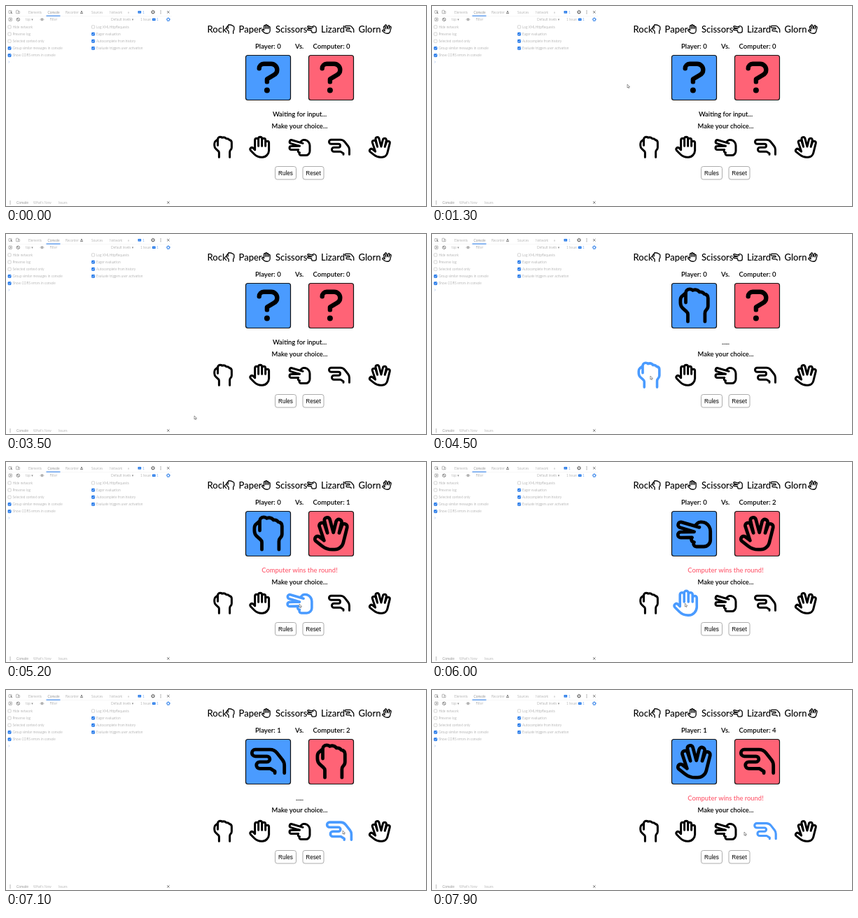
These frames come from a looping animation (600 px wide and 286 px high, 8 s). An HTML page with a canvas:

```html
<!DOCTYPE html>
<html lang="en">
<head>
<meta charset="utf-8">
<title>Hand game</title>
<style>
html, body { margin: 0; width: 100%; height: 100%; overflow: hidden; background: #fff; }
canvas { display: block; width: 600px; height: 286px; }
</style>
</head>
<body>
<canvas id="stage" width="600" height="286"></canvas>
<script>
const ctx = document.getElementById("stage").getContext("2d");
const LOOP = 8000;
const BLUE = "#4a9bff", RED = "#ff6376", LINK = "#1a73e8", GRAY = "#858585";
const FONT = "Lato, 'Open Sans', sans-serif";

// Centre lines on a 512-unit grid; cx is the horizontal middle.
const icon = (cx, path, width = 48) => ({ cx, width, path: new Path2D(path) });
const icons = {
  rock: icon(226, `M136 488V384Q136 362 116 345L66 300Q30 266 30 220V180Q30 146 54 124L106 80
    M106 216V80C106 48 130 24 163 24Q188 24 207 41Q224 32 243 32Q282 34 302 66Q346 58 370 92
    Q424 100 424 152V264Q424 300 398 324Q380 342 380 372V488`),
  paper: icon(246, `M136 320V96a40 40 0 0 1 80 0V232M216 96V64a40 40 0 0 1 80 0V232M296 96a40 40 0 0 1 80 0V232
    M376 160a40 40 0 0 1 80 0V336C452 420 385 488 304 488H288C226 488 167 464 123 420L36 332
    a40 40 0 0 1 56 -56L136 320`),
  scissors: icon(256, `M256 234L56 174a40 40 0 0 1 22 -77L330 170M268 150L301 115C313 101 330 94 348 94H358
    C404 94 446 118 469 157Q488 189 488 225V350a96 96 0 0 1 -96 96H288a40 40 0 0 1 -32 -64
    a40 40 0 0 1 -29 -67L65 318a40 40 0 0 1 -2 -80L256 234`),
  lizard: icon(256, `M488 424V316C488 288 479 260 461 237L382 137C358 106 321 88 282 88H72a48 48 0 0 0 0 96
    H240a40 40 0 0 1 0 80H136a48 48 0 0 0 0 96H288L352 400V424`),
  salute: icon(290, `M188 358L122 159a40 40 0 0 1 75 -28L236 249M236 249L194 74a40 40 0 0 1 76 -21L322 245
    L361 88a40 40 0 0 1 79 16L405 250M405 250L440 152a40 40 0 0 1 78 18L463 391C449 448 398 488 340 488H306
    C254 488 205 471 163 439L71 367a40 40 0 0 1 49 -63L188 358`),
  unknown: icon(160, `M32 128a64 64 0 0 1 64 -64H204a84 84 0 0 1 84 84c0 32 -18 60 -47 75L144 280v40`, 64)
};

const hands = [
  { name: "rock", label: "Rock", x: 310, labelX: 287.5, iconX: 320.5 },
  { name: "paper", label: "Paper", x: 362.5, labelX: 332.5, iconX: 371.5 },
  { name: "scissors", label: "Scissors", x: 419.5, labelX: 385, iconX: 437 },
  { name: "lizard", label: "Lizard", x: 476, labelX: 450, iconX: 490.5 },
  { name: "salute", label: "Glorn", x: 534, labelX: 503.5, iconX: 544 }
];

const rounds = [
  { click: 4400, result: 4800, pick: "rock", reply: "salute", winner: "Computer" },
  { click: 5350, result: 5750, pick: "scissors", reply: "salute", winner: "Computer" },
  { click: 6050, result: 6450, pick: "paper", reply: "rock", winner: "Player" },
  { click: 6900, result: 7300, pick: "lizard", reply: "rock", winner: "Computer" },
  { click: 7450, result: 7800, pick: "salute", reply: "lizard", winner: "Computer" }
];

// time, x, y
const track = [
  [100, 474, 236], [500, 250, 110], [900, 72, 9], [1000, 6, 12], [1300, 279, 112], [1600, 518, 234],
  [1900, 512, 190], [2100, 240, 266], [2300, 146, 276], [2600, 376, 90], [2900, 220, 190],
  [3100, 155, 88], [3300, 200, 180], [3500, 269, 260], [3700, 290, 240], [3900, 298, 222],
  [4100, 311, 203], [4600, 312, 203], [4800, 345, 206], [5050, 417, 204], [5200, 419, 203],
  [5550, 419, 203], [5800, 362, 202], [6350, 360, 202], [6700, 474, 201], [7100, 481, 201],
  [7200, 484, 201], [7350, 534, 202], [7600, 532, 202], [7780, 455, 203], [7900, 446, 203]
];

function cursorAt(t) {
  const next = track.findIndex(p => p[0] > t);
  if (next < 0) return track[track.length - 1].slice(1);
  if (next === 0) return [-20, -20];
  const [t0, x0, y0] = track[next - 1], [t1, x1, y1] = track[next];
  const u = (t - t0) / (t1 - t0), k = u * u * (3 - 2 * u);
  return [x0 + (x1 - x0) * k, y0 + (y1 - y0) * k];
}

// Share of the last 200 ms spent over a hand: grows and shrinks like a transition.
function hoverAmount(t, x) {
  const steps = 20;
  let inside = 0;
  for (let i = 0; i < steps; i++) {
    const [mx, my] = cursorAt(t - i * 200 / steps);
    if (Math.abs(mx - x) < 17 && Math.abs(my - 201.5) < 17) inside++;
  }
  return inside / steps;
}

function text(str, x, y, size, { color = "#000", weight = 400, align = "left", font = FONT } = {}) {
  ctx.font = `${weight} ${size}px ${font}`;
  ctx.fillStyle = color;
  ctx.textAlign = align;
  ctx.fillText(str, x, y);
}

function drawIcon(name, x, y, scale, color = "#000") {
  const { cx, width, path } = icons[name];
  ctx.save();
  ctx.translate(x, y);
  ctx.scale(scale, scale);
  ctx.translate(-cx, -256);
  ctx.lineWidth = width;
  ctx.lineCap = ctx.lineJoin = "round";
  ctx.strokeStyle = color;
  ctx.stroke(path);
  if (name === "unknown") dot(144, 440, 40, color);
  ctx.restore();
}

function dot(x, y, r, color) {
  ctx.fillStyle = color;
  ctx.beginPath();
  ctx.arc(x, y, r, 0, Math.PI * 2);
  ctx.fill();
}

function ring(x, y, r, color, width = 0.7) {
  ctx.beginPath();
  ctx.arc(x, y, r, 0, Math.PI * 2);
  ctx.strokeStyle = color;
  ctx.lineWidth = width;
  ctx.stroke();
}

function line(points, color, width = 0.7) {
  ctx.beginPath();
  points.forEach(([x, y]) => ctx.lineTo(x, y));
  ctx.strokeStyle = color;
  ctx.lineWidth = width;
  ctx.stroke();
}

function box(x, y, w, h, r, fill, stroke, width = 1) {
  ctx.beginPath();
  ctx.roundRect(x, y, w, h, r);
  ctx.fillStyle = fill;
  ctx.fill();
  if (!stroke) return;
  ctx.strokeStyle = stroke;
  ctx.lineWidth = width;
  ctx.stroke();
}

function small(str, x, y, color = GRAY) {
  text(str, x, y, 4.85, { color, weight: 300 });
}

function checkbox(x, y, label, checked) {
  box(x + 0.4, y - 2.2, 4.3, 4.3, 0.8, checked ? LINK : "#fff", checked ? LINK : "#aaa", 0.5);
  if (checked) line([[x + 1.2, y], [x + 2.2, y + 1], [x + 4, y - 1.2]], "#fff");
  small(label, x + 7, y + 1.7);
}

function gear(x, y, color) {
  ring(x, y, 1.8, color, 1);
  ctx.setLineDash([0.9, 0.9]);
  ring(x, y, 2.6, color);
  ctx.setLineDash([]);
}

function cross(x, y) {
  line([[x - 1.7, y - 1.7], [x + 1.7, y + 1.7]], "#444");
  line([[x + 1.7, y - 1.7], [x - 1.7, y + 1.7]], "#444");
}

function moreDots(x, y) {
  for (const dy of [-2, 0, 2]) dot(x, y + dy, 0.5, "#444");
}

function badge(x, y) {
  box(x, y - 2, 4.6, 3.6, 0.6, LINK);
  line([[x + 1, y - 0.3], [x + 3.6, y - 0.3]], "#fff", 0.5);
}

function drawPanel() {
  line([[0, 14.5], [237, 14.5]], "#f2f2f2", 0.6);

  box(4, 6.5, 4, 4, 0.5, "#fff", "#888", 0.6);
  line([[9, 11], [6.5, 8.5], [8, 8.5]], "#555");
  box(14.5, 6.2, 3, 4.6, 0.5, "#fff", "#888", 0.6);
  box(17.5, 7.5, 2, 3.3, 0.4, "#fff", "#888", 0.6);
  small("Elements", 32, 10.5);
  small("Console", 59.5, 10.5, "#444");
  box(57.5, 13.6, 20, 1, 0, LINK);
  small("Recorder", 85, 10.5);
  line([[107.5, 7], [107.5, 8.3], [106.4, 10.5], [109.6, 10.5], [108.5, 8.3], [108.5, 7]], "#555");
  small("Sources", 122, 10.5);
  small("Network", 148, 10.5);
  small("»", 174, 10.5, "#444");
  badge(188.5, 9);
  small("1", 195, 10.5, LINK);
  gear(210, 8.7, "#555");
  moreDots(221, 8.7);
  cross(231.8, 8.7);

  box(4, 17, 4.4, 4.4, 0.4, "#fff", "#888", 0.6);
  line([[5.5, 18], [7.2, 19.2], [5.5, 20.4]], "#555");
  ring(17.3, 19.3, 2.2, "#555");
  line([[15.8, 17.8], [18.8, 20.8]], "#555");
  small("top ▾", 28, 21);
  ring(51.5, 19.3, 1, "#555");
  line([[48.8, 19.3], [50.2, 17.8], [52.8, 17.8], [54.2, 19.3], [52.8, 20.8], [50.2, 20.8], [48.8, 19.3]], "#888", 0.5);
  small("Filter", 62.5, 21);
  small("Default levels ▾", 150, 21);
  small("1 Issue:", 192, 21);
  badge(209, 19.5);
  small("1", 215, 21, LINK);
  gear(231.8, 19.3, LINK);

  ["Hide network", "Preserve log", "Selected context only", "Group similar messages in console",
    "Show CORS errors in console"].forEach((label, i) => checkbox(2.5, 30 + i * 10.15, label, i > 2));
  ["Log XMLHttpRequests", "Eager evaluation", "Autocomplete from history",
    "Evaluate triggers user activation"].forEach((label, i) => checkbox(122, 30 + i * 10.15, label, i > 0));
  line([[3.5, 78.6], [5, 80], [3.5, 81.4]], "#a5c3f3");

  moreDots(6, 281);
  small("Console", 15, 283, "#444");
  small("What's New", 39, 283);
  small("Issues", 75, 283);
  cross(231.8, 281);
}

function gameState(t) {
  const state = { player: "unknown", computer: "unknown", status: "Waiting for input...", color: "#000", score: { Player: 0, Computer: 0 } };
  for (const { click, result, pick, reply, winner } of rounds) {
    if (t < click) break;
    state.player = pick;
    state.status = ".....";
    state.color = "#000";
    if (t < result) break;
    state.computer = reply;
    state.status = `${winner} wins the round!`;
    state.color = winner === "Player" ? BLUE : RED;
    state.score[winner]++;
  }
  return state;
}

function drawButton(label, x) {
  box(x, 229.5, 30, 18.5, 3, "#fff", "#999", 0.8);
  text(label, x + 15, 241.7, 8.2, { align: "center", font: "'Liberation Sans', Arial, sans-serif" });
}

function drawGame(t) {
  const { player, computer, status, color, score } = gameState(t);
  const body = { weight: 600 }, centered = { weight: 600, align: "center" };

  for (const { name, label, labelX, iconX } of hands) {
    text(label, labelX, 37.8, 13, { weight: 500 });
    drawIcon(name, iconX, 33, 0.027);
  }
  text(`Player: ${score.Player}`, 356, 61, 9.6, body);
  text("Vs.", 413, 61, 9.6, body);
  text(`Computer: ${score.Computer}`, 438.5, 61, 9.6, body);

  box(342.5, 70.5, 64, 64, 3, BLUE, "#111", 1.2);
  box(432.5, 70.5, 64, 64, 3, RED, "#111", 1.2);
  drawIcon(player, 374.5, 102, 0.1);
  drawIcon(computer, 464.5, 102, 0.1);

  text(status, 419.5, 157.5, 9.4, { ...centered, color });
  text("Make your choice...", 419.5, 175, 9.4, centered);

  for (const { name, x } of hands) {
    const h = hoverAmount(t, x);
    drawIcon(name, x, 201.7, 0.0625 * (1 + 0.2 * h), h > 0 ? BLUE : "#000");
  }
  drawButton("Rules", 384.5);
  drawButton("Reset", 424);
}

function drawCursor(t) {
  const [x, y] = cursorAt(t);
  ctx.beginPath();
  [[0, 0], [0, 5], [1.1, 4], [1.9, 5.6], [2.6, 5.2], [1.9, 3.7], [3.5, 3.6]].forEach(([dx, dy]) => ctx.lineTo(x + dx, y + dy));
  ctx.closePath();
  ctx.fillStyle = "#fff";
  ctx.fill();
  ctx.strokeStyle = "#555";
  ctx.lineWidth = 0.6;
  ctx.stroke();
}

function frame(now) {
  const t = now % LOOP;
  ctx.fillStyle = "#fff";
  ctx.fillRect(0, 0, 600, 286);
  drawPanel();
  drawGame(t);
  drawCursor(t);
  requestAnimationFrame(frame);
}
requestAnimationFrame(frame);
</script>
</body>
</html>
```
